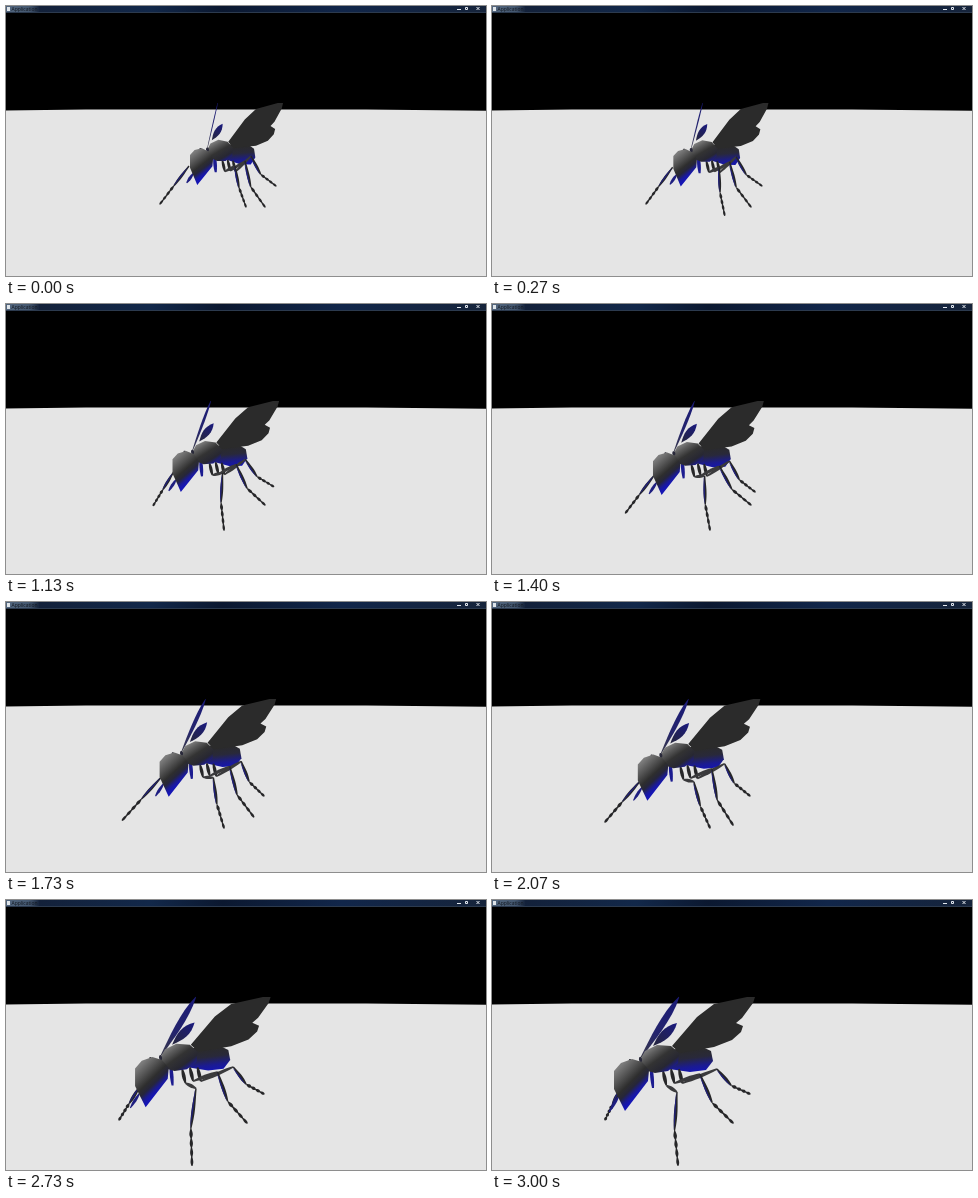
Animation, 480 px wide and 270 px high, one loop 3.07 s. Source, as an HTML page with a canvas:

```html
<!DOCTYPE html>
<html lang="en">
<head>
<meta charset="utf-8">
<title>Walking insect</title>
<style>
html, body { margin: 0; width: 100%; height: 100%; overflow: hidden; background: #000; }
canvas { display: block; width: 480px; height: 270px; }
</style>
</head>
<body>
<canvas id="stage" width="480" height="270"></canvas>
<script>
const ctx = document.getElementById('stage').getContext('2d');
const LOOP = 3070;
const WALK = 3000;
const TICK = 200 / 3;
// Ticks on which the picture pauses
const HELD = new Set([3, 7, 9, 11, 13, 14, 20, 30, 36, 42]);

const parse = text => text.split(' ').map(p => p.split(',').map(Number));

// Body outlines as they stand at the end of the walk
const ABDOMEN = parse('172,152 204,144 219,151 221,161 214,170 198,172 170,168');
const THORAX = parse('147,162 153,151 165,145 179,146 187,153 186,163 176,171 163,173 152,170');
const HEAD = parse('122,171 129,163 140,159 150,162 157,170 156,181 133,211 127,199 122,189');
const WING = parse('180,146 205,117 222,104 255,97 263,97 261,103 250,118 244,123 251,126 249,132 240,140 222,147 188,153');

// Hip at the end of the walk, knee at both ends, and steps: [from ms, to ms, foot before, foot after]
const LEGS = {
  frontFar: { hip: [143, 172], knee: [[183, 160], [128, 189]], bend: 0,
    steps: [[1000, 1800, [154, 198], [113, 220]]] },
  rear: { hip: [187, 169], knee: [[245, 150], [225, 169]], bend: .11,
    steps: [[1000, 1700, [270, 180], [258, 194]]] },
  middle: { hip: [179, 169], knee: [[239, 155], [208, 174]], bend: .1,
    steps: [[1400, 1930, [259, 201], [241, 223]]] },
  front: { hip: [171, 171], knee: [[229, 160], [185, 192]], bend: .04,
    steps: [[0, 800, [240, 201], [218, 226]], [2200, 2730, [216, 227], [186, 265]]] }
};

const mix = (a, b, k) => a + (b - a) * k;
const mixPoint = (p, q, k) => [mix(p[0], q[0], k), mix(p[1], q[1], k)];
const clamp = k => Math.min(1, Math.max(0, k));

// Moves a point back along the walk; near parts shift and shrink the most
function place([x, y], u, far = false) {
  const height = y - 97;
  const depth = far ? mix(.62, 1, clamp(height / 62)) : 1;
  const dx = (62 - .34 * (x - 122)) * depth;
  const dy = -height * (.27 - .0015 * (x - 140));
  return [x + dx * (1 - u), y + dy * (1 - u)];
}

function footAt(steps, t) {
  const [from, to, before, after] = steps.findLast(s => t >= s[0]) || steps[0];
  return mixPoint(before, after, clamp((t - from) / (to - from)));
}

function fill(points, paint) {
  ctx.beginPath();
  points.forEach(p => ctx.lineTo(...p));
  ctx.closePath();
  ctx.fillStyle = paint;
  ctx.fill();
}

function gradient(from, to, ...stops) {
  const g = ctx.createLinearGradient(...from, ...to);
  stops.forEach(([at, color]) => g.addColorStop(at, color));
  return g;
}

// Tapered blade: thin at both ends, widest where skew puts its belly
function blade(a, b, width, paint, skew = 1, tip = 0) {
  const length = Math.hypot(b[0] - a[0], b[1] - a[1]) || 1;
  const nx = (a[1] - b[1]) / length, ny = (b[0] - a[0]) / length;
  const side = sign => Array.from({ length: 9 }, (_, i) => {
    const [x, y] = mixPoint(a, b, i / 8);
    const half = sign * (tip + (width - tip) * Math.sin(Math.PI * (i / 8) ** skew)) / 2;
    return [x + nx * half, y + ny * half];
  });
  fill([...side(1), ...side(-1).reverse()], paint);
}

function drawScene() {
  ctx.fillStyle = '#000';
  ctx.fillRect(0, 0, 480, 270);
  fill([[0, 104.6], [80, 103.4], [360, 103.6], [480, 104.8], [480, 270], [0, 270]], '#e5e5e5');
  ctx.fillStyle = gradient([0, 0], [480, 0],
    [0, '#53677f'], [.05, '#43566e'], [.07, '#13213a'], [.3, '#12284a'], [.45, '#0b1830'], [.7, '#11264a'], [1, '#16243b']);
  ctx.fillRect(0, 0, 480, 6);
  ctx.fillStyle = '#2c3a4e';
  ctx.fillRect(0, 6, 480, 1);
  ctx.fillStyle = '#dfe5ea';
  ctx.fillRect(1, 1, 3, 4);
  ctx.fillStyle = '#10151d';
  ctx.font = '5px "Open Sans", sans-serif';
  ctx.fillText('Application', 5.5, 4.8);
  ctx.strokeStyle = '#e2e7ee';
  ctx.lineWidth = 1;
  ctx.beginPath();
  ctx.moveTo(451, 3.5); ctx.lineTo(455, 3.5);
  ctx.rect(459.5, 1.5, 2, 2);
  ctx.moveTo(470.5, 1); ctx.lineTo(473.5, 4);
  ctx.moveTo(473.5, 1); ctx.lineTo(470.5, 4);
  ctx.stroke();
}

function drawLeg({ hip, knee, bend, steps }, t, u) {
  const size = mix(.85, 1.1, u);
  const root = place(hip, u);
  const coxa = [root[0] + 3 * size, root[1] + 13 * size];
  const joint = mixPoint(...knee, u);
  const foot = footAt(steps, t);
  const middle = mixPoint(joint, foot, .52);
  const shin = [middle[0] - (foot[1] - joint[1]) * bend, middle[1] + (foot[0] - joint[0]) * bend];
  const dark = '#262628';
  if (bend) {
    blade(root, coxa, 3.4 * size, dark, 1, 1.5);
    blade(coxa, joint, 3.4 * size, '#3a3a3c', 1, 1.5);
  }
  blade(joint, shin, 3.2 * size, dark, 1.3, 1.3);
  blade(joint.map((v, i) => v - (i ? -.6 : .8)), shin.map((v, i) => v - (i ? -.4 : .8)), 1.4, '#20207c');
  for (let i = 0; i < 4; i++) {
    blade(mixPoint(shin, foot, i / 4), mixPoint(shin, foot, (i + 1.1) / 4), (3.2 - i * .2) * size, dark, 1.4, 1);
  }
}

function draw(t) {
  const u = (t / WALK) ** 1.3;
  const near = (x, y) => place([x, y], u);
  const far = (x, y) => place([x, y], u, true);
  const body = (outline, paint) => fill(outline.map(p => place(p, u)), paint);
  drawScene();

  blade(far(187, 97), far(148, 159), mix(1, 7, u),
    gradient(far(187, 97), far(148, 159), [0, '#1b1b78'], [.6, '#24246c'], [1, '#3c3c44']), .75, .5);
  blade(far(185, 123), far(161, 146), mix(6, 9, u),
    gradient(far(185, 123), far(161, 146), [0, '#1a1a80'], [1, '#26263c']), .9);

  drawLeg(LEGS.frontFar, t, u);
  blade(near(127, 196), near(117, 212), 3, '#1e1e80', 1, 1);
  blade(near(159, 166), near(161, 188), 3.6, '#1c1c90', 1, 2);

  body(ABDOMEN, gradient(near(203, 149), near(206, 173),
    [0, '#2b2b2b'], [.35, '#29293a'], [.7, '#1b1b90'], [1, '#1414b8']));
  drawLeg(LEGS.rear, t, u);
  drawLeg(LEGS.middle, t, u);
  drawLeg(LEGS.front, t, u);

  body(THORAX, gradient(near(154, 148), near(173, 174),
    [0, '#8c8c8c'], [.25, '#5c5c5c'], [.5, '#333'], [.8, '#272732'], [1, '#1a1a98']));
  body(WING, '#2b2b2b');
  blade(near(138, 163), near(138, 159), 2.5, '#35353d', 1, 1.5);
  blade(near(149, 162), near(148, 157), 3, '#29293a', 1, 1.5);
  body(HEAD, gradient(near(124, 170), near(147, 193),
    [0, '#7c7c7c'], [.3, '#545454'], [.58, '#2e2e2e'], [.74, '#26263a'], [.9, '#1a1a98'], [1, '#1515b4']));
}

function frame() {
  let tick = Math.floor((performance.now() % LOOP + 3.4) / TICK);
  while (HELD.has(tick)) tick--;
  draw(Math.min(WALK, tick * TICK));
  requestAnimationFrame(frame);
}
frame();
</script>
</body>
</html>
```
